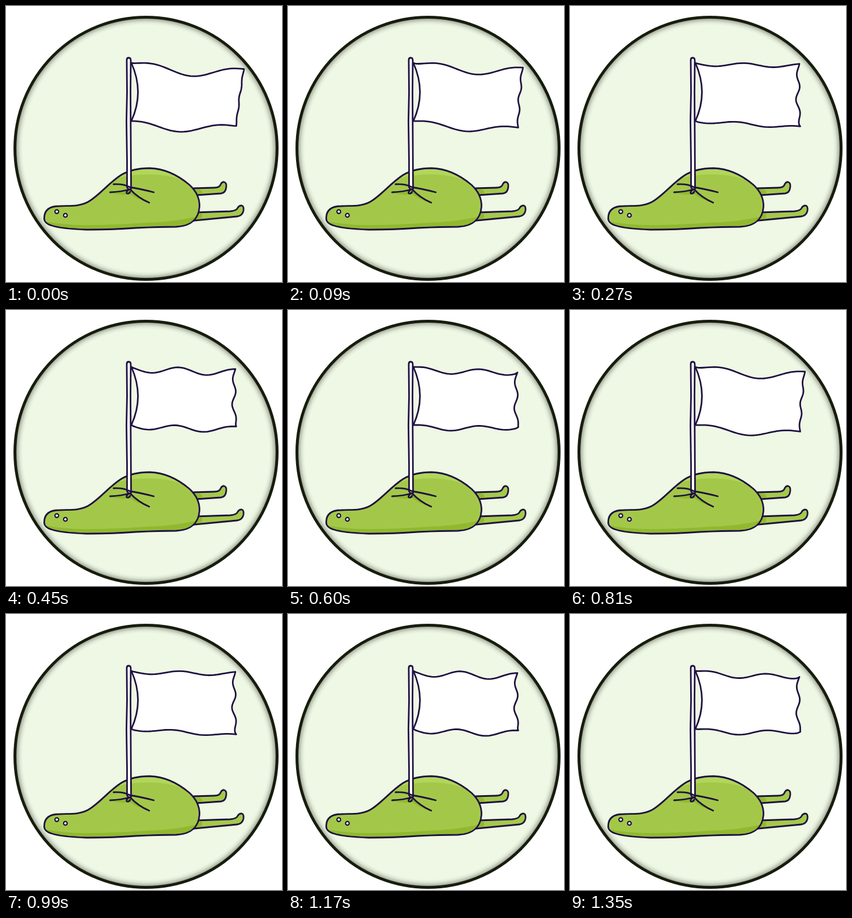
Write an HTML page that moves like this. It is 480 px wide and 480 px high and loops after 1440 ms.

```html
<!DOCTYPE html>
<html lang="en">
<head>
<meta charset="utf-8">
<title>White flag</title>
<style>
  html, body { margin: 0; width: 100%; height: 100%; overflow: hidden; background: #fff; }
  svg { display: block; width: 100%; height: 100%; }
  .ink { stroke: #1f1040; stroke-width: 2.8; stroke-linecap: round; stroke-linejoin: round; }
  .shade { fill: #90b92f; }
</style>
</head>
<body>
<svg viewBox="0 0 480 480">
  <defs>
    <radialGradient id="rim">
      <stop offset=".94" stop-color="#eef8e4"/>
      <stop offset=".96" stop-color="#e0e9d7"/>
      <stop offset=".98" stop-color="#b9c1b1"/>
      <stop offset="1" stop-color="#7f8777"/>
    </radialGradient>
    <path id="body" d="M66.500 368C67 354 77 348 93 348C110 347 127 349 142 341C161 331 178 308 200 294C215 285 232 282 250 282C282 283 306 300 319 311C331 322 337 334 336.500 349C335 370 322 383 296 384C270 384 246 385 225 386C200 388 165 389 140 389C115 388 92 386 80 382C70 379 66 375 66.500 368Z"/>
    <clipPath id="inBody"><use href="#body"/></clipPath>
  </defs>

  <circle cx="243.5" cy="247.5" r="228" fill="url(#rim)" stroke="#171c0c" stroke-width="5"/>

  <g class="ink" fill="#a4c94a">
    <path d="M326 317L362 316Q371 316 373 311Q375 306 379 306Q384 307 383 315Q382 325 374 326L330 329Z"/>
    <path d="M330 359L390 357Q401 356 403 351Q405 347 410 347Q414 348 413 356Q411 365 402 366L318 374Z"/>
  </g>
  <path class="shade" d="M330 319L337 319Q343 323 341 327L330 327ZM332 361L340 361Q343 366 339 370L322 372Z"/>

  <g clip-path="url(#inBody)">
    <use href="#body" fill="#a3c849"/>
    <path d="M180 304Q215 291 255 293Q295 294 326 312L300 275H190Z" fill="#b0d65b"/>
    <path class="shade" d="M60 373Q100 382 150 381Q200 380 240 377Q290 376 333 366V395H60Z"/>
    <path class="shade" d="M182 325Q200 324 214 320Q230 333 248 341Q228 337 216 327Q200 330 182 325Z"/>
  </g>
  <use href="#body" class="ink" fill="none"/>

  <path id="flag" class="ink" fill="#fff"/>
  <path class="ink" fill="#fff" d="M210 94Q210 90 213.500 90Q217 90 217 95L216.500 150L217 230L217.500 318Q213 321 210.500 315L210.500 270L209.500 200L210.500 150Z"/>

  <g class="ink" fill="none">
    <path d="M187 310Q205 309 215 315Q234 318 257 324M181 324Q202 323 214 319M216 319Q230 334 249 342"/>
    <path d="M214 319Q208 323 210 326Q214 327 216 323"/>
  </g>
  <g class="ink" fill="#fff" style="stroke-width:2.2">
    <circle cx="88.300" cy="357.600" r="3.200"/>
    <circle cx="103.300" cy="364" r="3.200"/>
  </g>
</svg>

<script>
const LOOP = 1440, WAVE = 720, STEPS = 40;
const flag = document.getElementById('flag');

// The ripple as it runs from the pole to the free end.
const RIPPLE = [
  { at: 0,    trough: 155, length: 170, depth: 20 },
  { at: .375, trough: 245, length: 113, depth: 8 },
  { at: .625, trough: 247, length: 105, depth: 14 },
  { at: .875, trough: 290, length: 110, depth: 11 },
  { at: 1,    trough: 325, length: 170, depth: 20 },
];

const swing = turns => Math.cos(2 * Math.PI * turns);
const taper = u => Math.sqrt(Math.sin(Math.PI * Math.min(u, .9999)));
const sample = place => Array.from({ length: STEPS + 1 }, (_, i) => place(i / STEPS));

function rippleAt(p) {
  const n = RIPPLE.findIndex(key => key.at > p);
  const a = RIPPLE[n - 1], b = RIPPLE[n];
  const u = ((p - a.at) / (b.at - a.at)) ** 1.5;
  const mix = name => a[name] + (b[name] - a[name]) * u;
  return { trough: mix('trough'), length: mix('length'), depth: mix('depth') };
}

// A rippling edge from the pole to a free corner.
function edge(startY, [endX, endY], { trough, length, depth }) {
  return sample(u => {
    const x = 218 + (endX - 218) * u;
    const dip = depth * (1 + swing((x - trough) / length)) / 2;
    return [x, startY + (endY - startY) * u * u + dip * taper(u)];
  });
}

// The free edge, with its own smaller ripple.
function freeEdge([x0, y0], [x1, y1], p) {
  const depth = 2 + 5 * Math.min(1, p / .3);
  const length = .35 + .2 * p;
  return sample(v => {
    const dent = depth * (1 + swing((v - .15) / length)) / 2;
    return [x0 + (x1 - x0) * v - dent * taper(v), y0 + (y1 - y0) * v];
  });
}

function draw(t) {
  const p = t % WAVE / WAVE;
  const ripple = rippleAt(p);
  const head = [399 + 15 * Math.max(0, 1 - p / .35), 105 + 5 * swing(p + .05)];
  const foot = [400.5, 207 + 5 * swing(p - .2)];
  const lowRipple = {
    trough: ripple.trough - 25 + 30 * p,
    length: ripple.length,
    depth: ripple.depth * .85,
  };
  const outline = [
    ...edge(99, head, ripple),
    ...freeEdge(head, foot, p),
    ...edge(200, foot, lowRipple).reverse(),
  ];
  flag.setAttribute('d', `M${outline.join('L')}Q241 150 218 99Z`);
}

// Each drawing is held for 90 ms, with two extra changes near the middle.
function heldTime(t) {
  return Math.max(Math.floor(t / 90) * 90, t >= 600 ? 600 : 0, t >= 690 ? 690 : 0);
}

function tick() {
  draw(heldTime(performance.now() % LOOP));
  requestAnimationFrame(tick);
}
tick();
</script>
</body>
</html>
```
